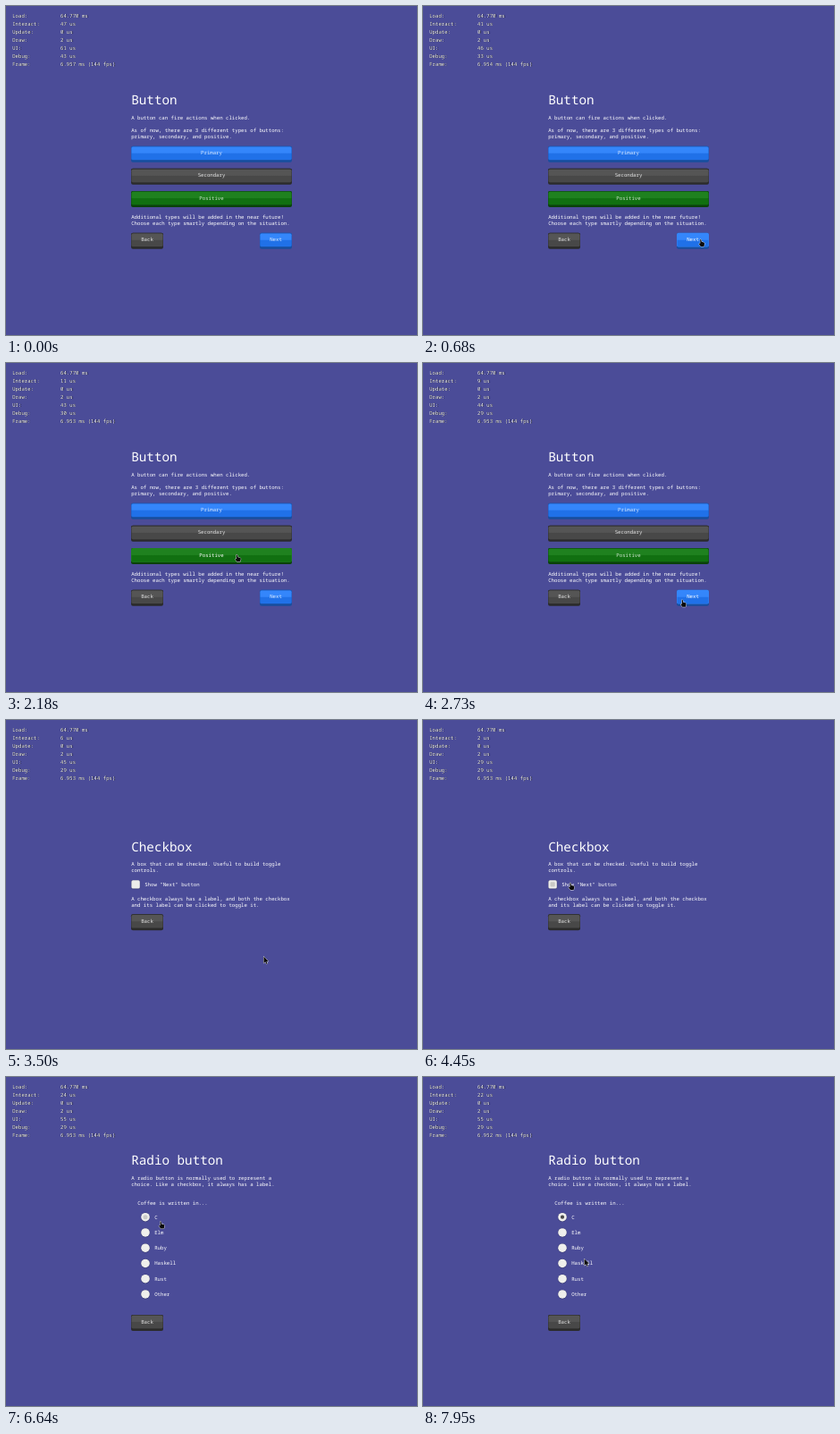
These frames come from a looping animation (460 px wide and 368 px high, 8 s). An HTML page with a canvas:

```html
<!DOCTYPE html>
<html lang="en">
<head>
<meta charset="utf-8">
<title>Interface tour</title>
<style>
  html, body { margin: 0; width: 100%; height: 100%; overflow: hidden; background: #4b4c98; }
  canvas { display: block; }
</style>
</head>
<body>
<canvas id="stage" width="460" height="368"></canvas>
<script>
const ctx = document.getElementById('stage').getContext('2d');
const LOOP = 8000, FPS = 22, BACKGROUND = '#4b4c98';
const BODY = 5.7, TITLE = 14.27, LINE = 7.19, LEFT = 140.2;
const BUTTON_GAP = 25.15, RADIO_GAP = 17.25;

const CHECKBOX_PAGE = 3360, TOGGLE = 4650, RADIO_PAGE = 5720, SELECT = 6750;
const CLICKS = [CHECKBOX_PAGE, TOGGLE, RADIO_PAGE, SELECT];
const PRESS_TIME = 120;
const LANGUAGES = ['C', 'Elm', 'Ruby', 'Haskell', 'Rust', 'Other'];

// The pointer glides to each stop and rests there until the next one.
const ENTRY = { x: 437, y: 222 };
const STOPS = [
  { x: 301, y: 263, arrive: 800 },
  { x: 229, y: 170, arrive: 1640 },
  { x: 288.5, y: 264.5, arrive: 2600 },
  { x: 163.2, y: 181.8, arrive: 4300 },
  { x: 309.3, y: 231, arrive: 5500 },
  { x: 171.3, y: 161.2, arrive: 6570 },
  { x: 179, y: 241, arrive: 7080, travel: 320 },
  { x: 180.6, y: 203.4, arrive: 7360, travel: 260 }
];

const COLORS = {
  primary: { top: '#3486fb', bottom: '#2071e8', lip: '#174e9e', edge: '#1c5cbd', text: '#dcebff' },
  secondary: { top: '#555', bottom: '#484848', lip: '#2b2b2b', edge: '#303030', text: '#e4e4e4' },
  positive: { top: '#1f811f', bottom: '#117011', lip: '#0a420a', edge: '#0d4d10', text: '#cfe6cf' }
};

let now, mouse, pressed, hot;

const clamp = u => Math.min(1, Math.max(0, u));
const smooth = u => u * u * (3 - 2 * u);
const mix = (a, b, u) => a + (b - a) * u;

function pointerAt(t) {
  return STOPS.reduce((from, { x, y, arrive, travel = 800 }) => {
    const u = smooth(clamp(1 + (t - arrive) / travel));
    return { x: mix(from.x, x, u), y: mix(from.y, y, u) };
  }, ENTRY);
}

// Smooth reading that passes through evenly spaced values over the loop.
function reading(...values) {
  const position = now / LOOP * (values.length - 1);
  const i = Math.floor(position);
  return Math.round(mix(values[i], values[i + 1], smooth(position - i)));
}

function text(str, x, baseline, color = '#fff', size = BODY, align = 'left') {
  ctx.font = `500 ${size}px "Noto Sans Mono", monospace`;
  ctx.textAlign = align;
  ctx.fillStyle = color;
  ctx.fillText(str, x, baseline);
}

function lines(baseline, ...rows) {
  rows.forEach((row, i) => text(row, LEFT, baseline + i * LINE));
}

function title(str, baseline) {
  text(str, LEFT, baseline, '#fff', TITLE);
}

function hover(x, y, w, h) {
  const inside = mouse && mouse.x >= x && mouse.x <= x + w && mouse.y >= y && mouse.y <= y + h;
  if (inside) hot = true;
  return inside;
}

function box(x, y, w, h, r, fill) {
  ctx.beginPath();
  ctx.roundRect(x, y, w, h, r);
  ctx.fillStyle = fill;
  ctx.fill();
}

function disc(x, y, r, fill) {
  box(x - r, y - r, 2 * r, 2 * r, r, fill);
}

function button(label, x, y, w, kind) {
  const c = COLORS[kind];
  const over = hover(x, y, w, 18);
  const drop = over && pressed ? 1.2 : 0;
  const face = ctx.createLinearGradient(0, y, 0, y + 15.5);
  face.addColorStop(0, c.top);
  face.addColorStop(0.48, c.top);
  face.addColorStop(0.55, c.bottom);
  face.addColorStop(1, c.bottom);
  box(x, y + drop, w, 18 - drop, 2, c.lip);
  box(x, y + drop, w, 15.8, 2, over ? c.top : c.edge);
  box(x + 0.5, y + 0.8 + drop, w - 1, 14.5, 1.6, face);
  text(label, x + w / 2, y + 9.6 + drop, over ? '#fff' : c.text, BODY, 'center');
}

function navigation(y, next) {
  button('Back', 140, y, 36, 'secondary');
  if (next) button('Next', 284, y, 36, 'primary');
}

function buttonPage() {
  title('Button', 110.3);
  lines(127.1, 'A button can fire actions when clicked.');
  lines(141, 'As of now, there are 3 different types of buttons:', 'primary, secondary, and positive.');
  ['Primary', 'Secondary', 'Positive'].forEach((label, i) =>
    button(label, 140, 156.7 + i * BUTTON_GAP, 180, label.toLowerCase()));
  lines(238.3, 'Additional types will be added in the near future!',
    'Choose each type smartly depending on the situation.');
  navigation(253.8, true);
}

function checkboxPage() {
  const checked = now >= TOGGLE;
  const over = hover(140, 179, 78, 10);
  title('Checkbox', 146.9);
  lines(163, 'A box that can be checked. Useful to build toggle', 'controls.');
  box(140, 179, 10.2, 10.2, 2, 'rgba(0,0,0,.25)');
  box(140.4, 179.2, 9.4, 9.4, 1.7, '#ededea');
  if (checked) box(142.5, 181.3, 5.2, 5.2, 0.8, '#484848');
  else if (over) box(142.5, 181.3, 5.2, 5.2, 0.8, '#c8c8c5');
  text('Show "Next" button', 155.2, 186);
  lines(201.9, 'A checkbox always has a label, and both the checkbox', 'and its label can be clicked to toggle it.');
  navigation(217.3, checked);
}

function radioPage() {
  title('Radio button', 97.9);
  lines(114.8, 'A radio button is normally used to represent a', 'choice. Like a checkbox, it always has a label.');
  text('Coffee is written in...', 147.3, 143.2);
  LANGUAGES.forEach((name, i) => {
    const y = 156.7 + i * RADIO_GAP;
    const over = hover(151, y - 5, 39, 10);
    disc(156, y + 0.1, 5.2, 'rgba(0,0,0,.25)');
    disc(156, y, 4.8, '#efefec');
    if (i === 0 && now >= SELECT) disc(156, y, 2.1, '#484848');
    else if (over) disc(156, y, 2.5, '#cbcbc8');
    text(name, 166.2, y + 2);
  });
  navigation(265.9, false);
}

function debugPanel() {
  const settling = Math.exp(-now / 500);
  const frame = 6.953 + 0.004 * settling - 7e-8 * now;
  const stats = {
    'Load:': '64.770 ms',
    'Interact:': reading(47, 38, 10, 6, 2, 41, 22, 22) + ' us',
    'Update:': '0 us',
    'Draw:': '2 us',
    'UI:': reading(61, 37, 43, 45, 29, 53, 55, 55) + ' us',
    'Debug:': Math.round(29.4 + 13.6 * settling) + ' us',
    'Frame:': frame.toFixed(3) + ' ms (144 fps)'
  };
  Object.entries(stats).forEach(([label, value], i) => {
    const y = 13 + i * 8.98;
    for (const [offset, color] of [[0.4, '#000'], [0, '#fff']]) {
      text(label, 7.2 + offset, y + offset, color);
      text(value, 61 + offset, y + offset, color);
    }
  });
}

function pointer() {
  const hand = 'M1.2 .4Q2.3 .2 2.4 1.4L2.7 3.2L5.2 3.8Q6.2 4.2 6 5.4L5.4 8.3H1.8L-.1 5.6Q-.2 4.6 1.4 5Z';
  const arrow = 'M0 0V7.4L1.8 5.8L3 8.4L4.1 7.9L3 5.4H5.3Z';
  const shape = new Path2D(hot ? hand : arrow);
  ctx.save();
  ctx.translate(mouse.x, mouse.y);
  ctx.lineWidth = 0.9;
  ctx.lineJoin = 'round';
  ctx.strokeStyle = '#e2e2e8';
  ctx.stroke(shape);
  ctx.fillStyle = '#0b0b0b';
  ctx.fill(shape);
  ctx.restore();
}

function draw() {
  const step = Math.floor((performance.now() % LOOP) * FPS / 1000 + 0.12);
  now = step * 1000 / FPS % LOOP;
  mouse = now < 60 ? null : pointerAt(now);
  pressed = CLICKS.some(click => now >= click - PRESS_TIME && now < click);
  hot = false;

  ctx.textRendering = 'geometricPrecision';
  ctx.fillStyle = BACKGROUND;
  ctx.fillRect(0, 0, 460, 368);
  debugPanel();
  if (now < CHECKBOX_PAGE) buttonPage();
  else if (now < RADIO_PAGE) checkboxPage();
  else radioPage();
  if (mouse) pointer();
  requestAnimationFrame(draw);
}
draw();
</script>
</body>
</html>
```
